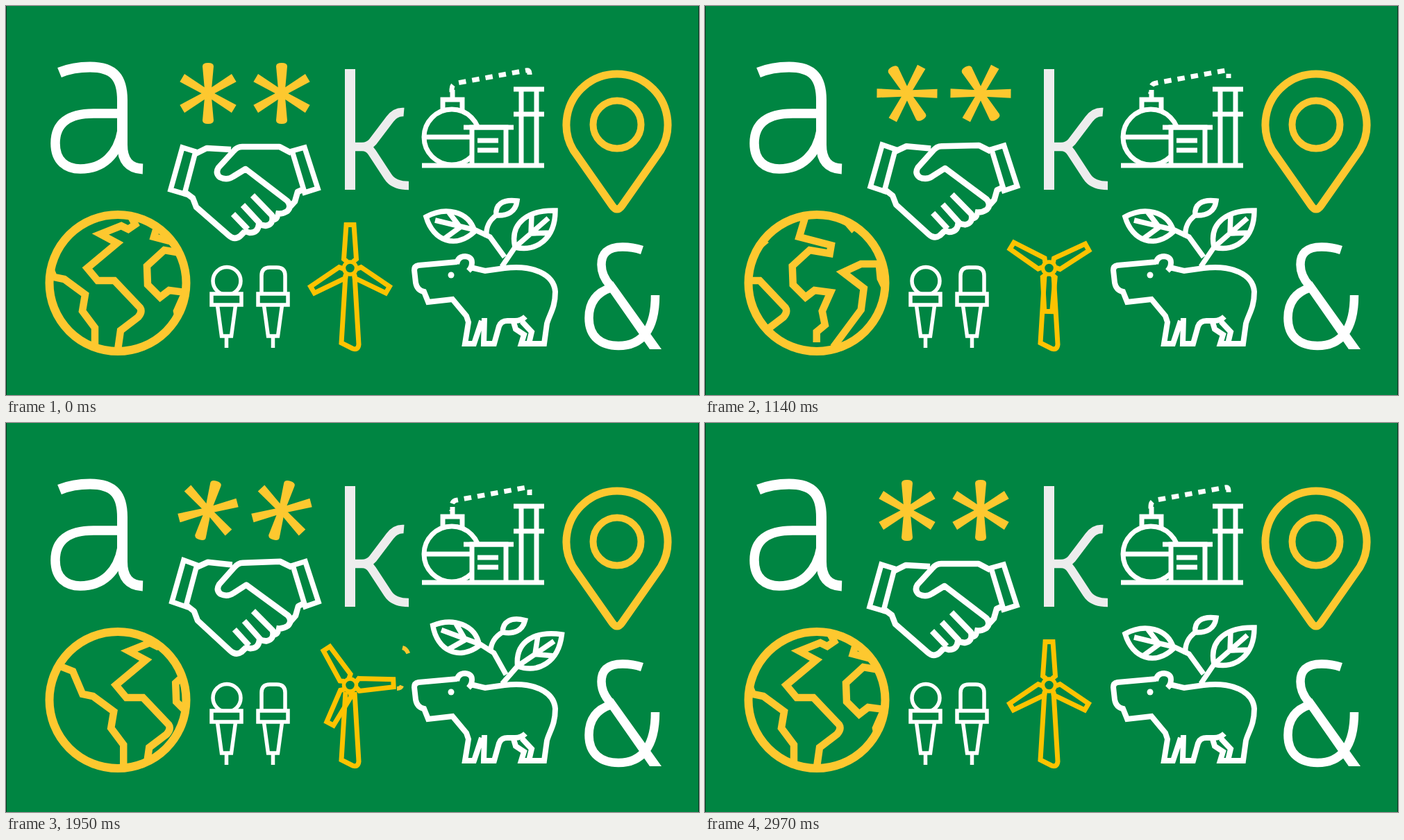
Recreate the animation shown at these times as an HTML page. Size 998 px wide and 561 px high, loop 3 s.

```html
<!DOCTYPE html>
<html lang="en">
<head>
<meta charset="utf-8">
<title>Icon wall</title>
<style>
html, body { margin: 0; width: 100%; height: 100%; overflow: hidden; background: #008542; }
svg { display: block; width: 100vw; height: 100vh; fill: none; }
.w { stroke: #fff; }
.y { stroke: #fdc82f; }
.g { stroke: #fdc300; }
.bg { fill: #008542; }
</style>
</head>
<body>
<svg viewBox="0 0 998 561">
  <defs>
    <clipPath id="disc"><circle cx="161" cy="399.5" r="98"/></clipPath>
    <g id="map">
      <path d="M45 322L35 350 55 358 69 391 84 394 114 416 110 440 128 464V505"/>
      <path d="M178 300L186 315 176 322 166 317 136 329 160 342 117 378 132 396H156L193 435Q197 441 190 449L165 468 160 503"/>
      <path d="M222 303L213 333 259 345 257 357 228 352 203 375 204 402 222 420 235 410 258 413 246 440 250 460 238 470V485"/>
      <path d="M262 492L302 438 306 407 276 384 302 372H328L330 393 344 422 357 390 400 394 386 376 392 344 380 334H440L458 303"/>
      <path d="M277 306L289 320 301 308 335 305M366 468L378 456 411 452 421 472 420 497"/>
    </g>
    <path id="petal" d="M-4.500 0L-8-39Q-8-44 0-44T8-39L4.500 0Z"/>
    <path id="arm" d="M-4.500 0L-6.500-43.500H6.500L4.500 0Z"/>
    <g id="star" fill="#fdc82f">
      <use href="#petal"/><use href="#petal" transform="rotate(180)"/>
      <use href="#arm" transform="rotate(59)"/><use href="#arm" transform="rotate(121)"/>
      <use href="#arm" transform="rotate(-59)"/><use href="#arm" transform="rotate(-121)"/>
    </g>
    <path id="blade" d="M-4-9L-9-13-5.500-62.500H5.500L9-13 4-9"/>
    <path id="mic" d="M-21.500 415H21.500V431H-21.500ZM-13 432L-7 476H7L13 432M0 476V493"/>
  </defs>

  <path d="M.5 0V561M997.5 0V561" stroke="#06391f"/>

  <!-- letters -->
  <g class="w">
    <path stroke-width="15" d="M77 96C94 89 108 88 121 88C156 88 167.500 104 167.500 136V200Q167.500 234 197 235"/>
    <path stroke-width="13.500" d="M167 155H126C90 155 71 169 71 198C71 224 87 235 107 235C140 235 161 214 167 180"/>
    <path stroke-width="12.500" d="M916 352C904 348 895 347.500 888 347.500C865 347.500 857.500 358 857.500 373C857.500 385 862 394 870 403M872 406C850 413 839.500 428 839.500 450C839.500 477 857 490 882 490C915 490 935 468 935 417"/>
    <path fill="#fff" stroke="none" d="M865 406L874 397 944 495H927Z"/>
  </g>
  <g stroke="#ededed">
    <path d="M495.500 91V265" stroke-width="15"/>
    <path stroke-width="12.500" d="M573 153Q561 152 553 163L528 196Q522 203 513 203H500M513 203Q522 203 527 211L550 246Q558 259 580 259"/>
  </g>

  <use class="star" href="#star"/>
  <use class="star" href="#star"/>

  <!-- handshake -->
  <g class="w" stroke-width="8.500" stroke-linejoin="round">
    <g id="handL">
      <path stroke-linejoin="miter" stroke-width="7.500" d="M254 204L273 210 257 271 237 265Z"/>
      <path d="M273 213L289 205 324 207M257 268L269 277 274 290 321 331Q329 338 337 332L344 325M327 300L348 322M341 287L366 314"/>
    </g>
    <g id="handR">
      <path stroke-linejoin="miter" stroke-width="7.500" d="M412 209L430 204 449 263 430 269Z"/>
      <path d="M411 212L394 203H340Q333 203 328 209L306 233Q301 241 308 247Q318 252 327 246L345 235 405 281Q412 289 405 296Q397 301 388 299M429 264L420 268 416 282 407 292M355 273L383 302Q386 315 374 317L364 315Q363 327 351 327L342 324M390 300Q393 308 381 309"/>
    </g>
  </g>

  <!-- plant -->
  <g class="w" stroke-width="7">
    <circle cx="642" cy="189" r="40"/>
    <path d="M602 189H668M629 150V135H657V150M643 121V135"/>
    <path class="bg" d="M671 230V175H720V230"/>
    <path d="M659 175H731M679 194H709M679 208H709M742 120V230M764 120V230M731 120H775M731 156H775M599 230H775"/>
    <path id="smoke" stroke-dasharray="10.500 9" d="M754 104V97Q754 92 749 93L650 111Q642 112 642 120V127"/>
  </g>

  <!-- pin -->
  <g class="y" stroke-width="11">
    <path d="M873 288L817 208A73 73 0 1 1 943 208L887 288Q880 298 873 288Z"/>
    <circle cx="880" cy="171" r="34.5" stroke-width="10"/>
  </g>

  <!-- globe -->
  <g class="y">
    <g clip-path="url(#disc)" stroke-width="10.500">
      <g id="world"><use href="#map"/><use href="#map" x="455"/></g>
    </g>
    <circle cx="161" cy="399.5" r="98.5" stroke-width="12"/>
  </g>

  <!-- microphones -->
  <g class="w" stroke-width="5.500">
    <circle cx="318" cy="396.5" r="20"/>
    <use href="#mic" class="bg" x="317.5"/>
    <path d="M368 413V389Q368 377 380 377H390Q402 377 402 389V413"/>
    <use href="#mic" x="384.5"/>
  </g>

  <!-- turbine -->
  <g class="g" stroke-width="7">
    <path d="M489 388L483 486 499 494Q507 497 508 488L502 388"/>
    <g id="rotor">
      <use href="#blade"/><use href="#blade" transform="rotate(120)"/><use href="#blade" transform="rotate(240)"/>
    </g>
    <circle class="bg" cx="495.5" cy="378" r="9" stroke-width="5.500"/>
    <g stroke="#fdc82f" stroke-width="6">
      <path class="wind" pathLength="100" d="M537 354H564Q581 353 581 339Q579 326 571 324"/>
      <path class="wind" pathLength="100" d="M537 367H563Q571 367 571 374Q571 383 563 383"/>
    </g>
  </g>

  <!-- capybara -->
  <g class="w" stroke-width="8">
    <path d="M650 369L594 374Q588 375 588 381L590 399Q592 410 602 412L608 427 643 423 663 447 666 456 661 487H674L685 454M689 450L688 487H703L710 462Q713 454 722 454H733Q742 454 748 448M731 456L734 466 746 474 742 487H775L779 458C783 444 791 435 791 412C789 386 757 373 718 378L690 382 669 377M743 455L757 470 753 487M649 372Q651 361 661 361Q671 362 671 370Q671 377 666 382"/>
    <ellipse id="eye" cx="641" cy="388" rx="4.5" ry="4.5" fill="#fff" stroke="none"/>
    <g id="leaves" stroke-width="7.500">
      <path d="M605 304C632 289 666 295 675 325C648 351 615 339 605 304ZM618 309L676 323 697 333 718 362M638 298L654 319 632 335"/>
      <path d="M736 281C715 278 704 287 706 302C722 303 734 297 736 281ZM707 301C693 311 691 322 692 333"/>
      <path d="M791 295C753 294 725 312 733 348C765 355 791 335 791 295ZM781 306L733 348 714 376M757 301L756 328 785 327"/>
    </g>
  </g>
</svg>
<script>
const LOOP = 3000, STEP = 30;
const $ = id => document.getElementById(id);
const all = name => document.querySelectorAll("." + name);
const move = (el, value) => el.setAttribute("transform", value);
const span = (t, a, b) => Math.min(1, Math.max(0, (t - a) / (b - a)));
const wave = p => (1 - Math.cos(Math.PI * p)) / 2;

// strong ease shared by stars, rotor and globe
function turn(t) {
  const p = span(t, 227, 2713);
  return p < .5 ? (2 * p) ** 3.5 / 2 : 1 - (2 - 2 * p) ** 3.5 / 2;
}

const SWAY = [[1140, 0], [1600, .97], [1930, .9], [2250, 1], [2700, 0]];
function sway(t) {
  let v = 0;
  for (let i = 1; i < SWAY.length; i++) {
    const [a, from] = SWAY[i - 1], [b, to] = SWAY[i];
    if (t >= a && t <= b) v = from + (to - from) * wave(span(t, a, b));
  }
  return v;
}

function draw(t) {
  const e = turn(t);
  all("star").forEach((s, i) => move(s, `translate(${291 + 106 * i} 126) rotate(${-180 * e})`));
  move($("rotor"), `translate(495.5 378) rotate(${360 * e})`);
  move($("world"), `translate(${-455 * e} 0)`);

  const shake = t > 340 && t < 2580 ? Math.sin(Math.PI * (t - 340) / 1120) ** 2 : 0;
  const hand = (id, k, dx) =>
    move($(id), `translate(${343 + dx * shake} ${-1.5 * shake}) skewY(${k * shake}) translate(-343 0)`);
  hand("handL", 3.2, 2);
  hand("handR", -2, 1);

  $("smoke").setAttribute("stroke-dashoffset", -5 - 78 * t / LOOP);

  const head = 100 * wave(span(t, 1310, 1610)), tail = 100 * wave(span(t, 1600, 2080));
  all("wind").forEach(w => {
    w.setAttribute("visibility", head > tail ? "visible" : "hidden");
    w.setAttribute("stroke-dasharray", `0 ${tail} ${head - tail} 200`);
  });

  move($("leaves"), `rotate(${7.5 * sway(t)} 712 380)`);
  $("eye").setAttribute("ry", 4.5 * Math.max(.1, span(Math.abs(t - 2330), 0, 120)));
}

function tick(now) {
  draw(Math.floor(now % LOOP / STEP) * STEP);
  requestAnimationFrame(tick);
}
draw(0);
requestAnimationFrame(tick);
</script>
</body>
</html>
```
